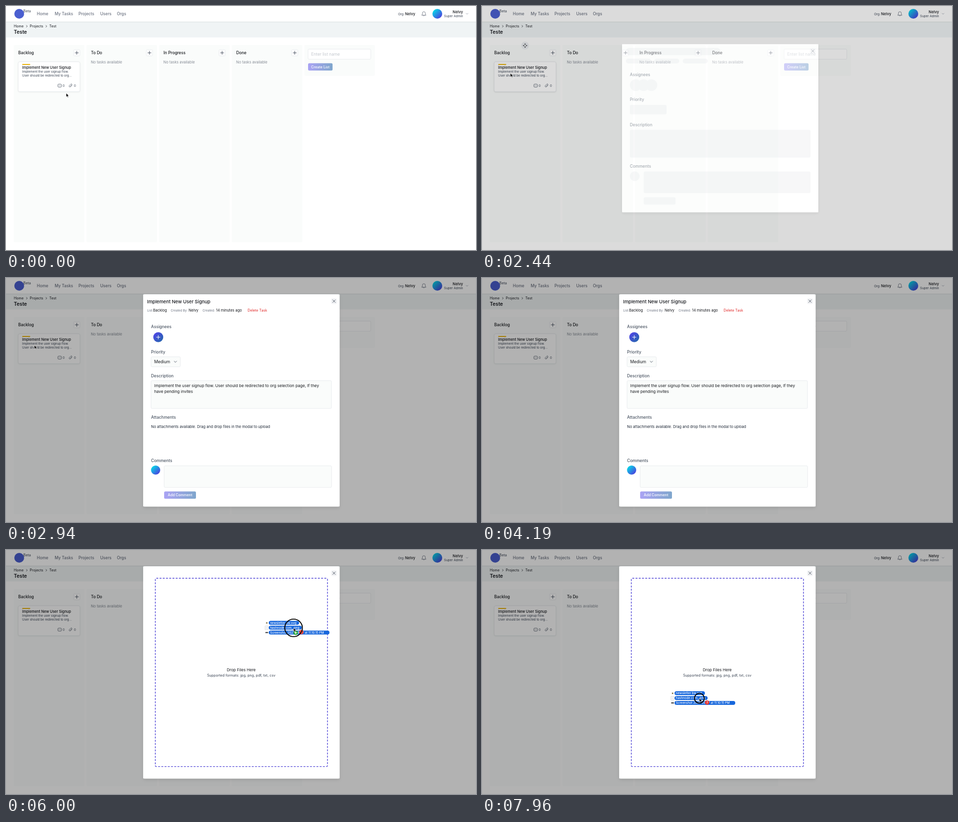
These frames come from a looping animation (960 px wide and 501 px high, 8 s). An HTML page:

```html
<!DOCTYPE html>
<html lang="en">
<head>
<meta charset="utf-8">
<title>Task board</title>
<style>
html, body { margin: 0; width: 100%; height: 100%; overflow: hidden; background: #fff; }
svg { display: block; width: 100%; height: 100%; }
text { font-family: Inter, "Open Sans", sans-serif; white-space: pre; }
</style>
</head>
<body>
<svg id="stage" viewBox="0 0 960 501" xmlns="http://www.w3.org/2000/svg"></svg>
<script>
const INK = '#16181d', GREY = '#6b7280', LABEL = '#4b5563', EDGE = '#e5e7eb', PANEL = '#fafcfb';
const USER = 'Nelvy';

// y is the middle of the capitals
const text = (x, y, size, str, fill = INK, weight = 400, anchor = 'start') =>
  `<text x="${x}" y="${y + size * 0.36}" font-size="${size}" fill="${fill}" font-weight="${weight}" text-anchor="${anchor}">${str}</text>`;
const rect = (x, y, w, h, r, fill, stroke = 'none', extra = '') =>
  `<rect x="${x}" y="${y}" width="${w}" height="${h}" rx="${r}" fill="${fill}" stroke="${stroke}" stroke-width=".8" ${extra}/>`;
const circle = (x, y, r, fill, extra = '') => `<circle cx="${x}" cy="${y}" r="${r}" fill="${fill}" ${extra}/>`;
const line = (d, stroke = INK, width = 0.9) =>
  `<path d="${d}" fill="none" stroke="${stroke}" stroke-width="${width}" stroke-linecap="round" stroke-linejoin="round"/>`;
const group = (id, body) => `<g id="${id}">${body}</g>`;
const plus = (x, y, r, stroke, width) => line(`M${x - r} ${y}h${2 * r}M${x} ${y - r}v${2 * r}`, stroke, width);
const chevron = (x, y, r, stroke) => line(`M${x - r} ${y - r / 2}l${r} ${r} ${r} ${-r}`, stroke);
const gradient = (id, from, to, axis) =>
  `<linearGradient id="${id}" ${axis}><stop stop-color="${from}"/><stop offset="1" stop-color="${to}"/></linearGradient>`;
const shadow = (id, dy, blur, alpha) =>
  `<filter id="${id}" x="-20%" y="-20%" width="140%" height="150%"><feDropShadow dx="0" dy="${dy}" stdDeviation="${blur}" flood-opacity="${alpha}"/></filter>`;
const button = (x, y, w, h, label) =>
  rect(x, y, w, h, 2.5, 'url(#button)') + text(x + w / 2, y + h / 2, 7.3, label, '#fff', 500, 'middle');
const close = (x, y) => rect(x - 6, y - 6, 12, 12, 3, '#f3f4f6') +
  line(`M${x - 2.8} ${y - 2.8}l5.6 5.6m0 -5.6l-5.6 5.6`, '#374151');

const DIAGONAL = 'x1=".12" y1=".12" x2=".88" y2=".88"';
const defs = `<defs>
  ${gradient('avatar', '#06dbe8', '#4b40de', DIAGONAL)}
  ${gradient('accent', '#4f46e5', '#2866b0', DIAGONAL)}
  ${gradient('button', '#aaa3f4', '#7fa6cc', 'x1="0" x2="1"')}
  ${shadow('soft', 0.6, 0.8, 0.1)}${shadow('lift', 1, 1.5, 0.16)}${shadow('deep', 2.5, 3, 0.12)}
</defs>`;

function header() {
  const nav = [[63, 'Home'], [99.5, 'My Tasks'], [148, 'Projects'], [192.5, 'Users'], [226.5, 'Orgs']];
  const crumbs = [[16, 'Home'], [48.5, 'Projects'], [88.5, 'Test']];
  return rect(0, 32, 960, 32.5, 0, '#f0f4f5') + rect(0, 0, 960, 32, 0, '#fff', 'none', 'filter="url(#soft)"') +
    circle(27, 16, 10, '#4a5fd0') + text(35.5, 10.3, 7.2, 'Beta', '#374151') +
    nav.map(([x, s]) => text(x, 16, 8.25, s, GREY, 500)).join('') +
    text(801, 16.3, 6.2, 'Org:', '#374151') + text(815, 16, 7.6, USER, INK, 500) +
    line('M849.3 18.7c1.2-1.2 1.2-2.3 1.2-4a3 3 0 0 1 6 0c0 1.7 0 2.8 1.2 4zM852 19.2a1.6 1.6 0 0 0 3 0', GREY) +
    circle(881, 16, 10, 'url(#avatar)') +
    text(933.5, 12.5, 7.7, USER, INK, 500, 'end') + text(933.5, 21, 6.35, 'Super Admin', '#374151', 400, 'end') +
    chevron(941.7, 16, 2, '#9ca3af') +
    crumbs.map(([x, s]) => text(x, 41.5, 7.15, s)).join('') +
    line('M41.7 39.8l1.8 1.8 -1.8 1.8M81.5 39.8l1.8 1.8 -1.8 1.8', INK, 0.8) +
    text(16, 53.3, 10.1, 'Teste', INK, 600);
}

function column(title, i) {
  const x = 16 + i * 148.4;
  return rect(x, 80, 144, 405, 2, PANEL) + text(x + 9, 96, 8.3, title, INK, 500) +
    rect(x + 122.2, 89.7, 12.8, 12.8, 2, '#fff', EDGE) + plus(x + 128.6, 96.1, 3.4, '#374151', 0.9) +
    (i ? text(x + 8.8, 115.5, 7.47, 'No tasks available', '#858b95') : '');
}

function card() {
  const box = f => rect(25, 114.6, 126, 61.2, 3, '#fff', EDGE, `filter="url(#${f})"`);
  return box('soft') + group('lifted', box('lift')) +
    rect(33, 119, 16.5, 2, 1, '#eab308') +
    text(33, 126.2, 7.35, 'Implement New User Signup', INK, 500) +
    text(33, 134.8, 6.3, 'Implement the user signup flow.', '#374151') +
    text(33, 142.8, 6.25, 'User should be redirected to org...', '#374151') +
    rect(106, 160.4, 7.2, 6.2, 1.6, 'none', '#4b5563') +
    line('M108 163.5h.1m1.5 0h.1m1.5 0h.1', '#4b5563', 0.7) + text(115.7, 163.5, 6.5, '0', '#4b5563') +
    line('M134.8 162.6l-3 3.2a1.7 1.7 0 0 1-2.5-2.3l3.2-3.2a1.2 1.2 0 0 1 1.8 1.6l-3 3.1', '#4b5563', 0.8) +
    text(138.7, 163.5, 6.5, '0', '#4b5563') +
    group('grip', circle(88, 81.3, 8, '#eceff2') +
      line('M84.2 81.3h7.6M88 77.5v7.6M87 78.5l1-1 1 1M87 84.1l1 1 1-1M85.2 80.3l-1 1 1 1M90.8 80.3l1 1-1 1', INK, 0.8) +
      circle(88, 81.3, 1.5, '#eceff2'));
}

const board = () => ['Backlog', 'To Do', 'In Progress', 'Done'].map(column).join('') + card() +
  rect(609.5, 80, 144, 63.5, 2, PANEL) + rect(617, 88.5, 128, 20.8, 2, '#fff', EDGE) +
  text(623.5, 99, 8.4, 'Enter list name', '#c3c7ce') + button(617, 117.6, 50, 14.8, 'Create List');

const LOADING = [286, 78.5, 401, 345], MODAL = [280.3, 33.4, 401, 435.8];
const sheet = box => rect(...box, 3, '#fff', 'none', 'filter="url(#deep)"');
const label = (x, y, s) => text(x, y, 8.4, s, LABEL, 500);

// the dimming leaves the open sheet's own area clear
const shadeAround = ([x, y, w, h]) => `M0 0H960V501H0ZM${x} ${y}h${w}v${h}h${-w}Z`;

function skeleton() {
  const BONE = '#eef0f2';
  const bone = (x, y, w, h, r = 3) => rect(x, y, w, h, r, BONE);
  return sheet(LOADING) + bone(294, 86, 193, 15, 7) +
    [294, 352, 410].map(x => bone(x, 108, 51, 10, 5)).join('') + close(675.7, 92.5) +
    label(302, 140.5, 'Assignees') + [314, 330, 346].map(x => circle(x, 162.5, 12, BONE)).join('') +
    label(302, 192.3, 'Priority') + bone(302, 203, 75, 19.5) +
    label(302, 244.2, 'Description') + bone(302, 254.3, 369, 57) +
    label(302, 329.3, 'Comments') + circle(312, 349.5, 10, BONE) +
    bone(330.3, 339.7, 340.7, 44.5) + bone(330.3, 392.8, 65, 15);
}

function details() {
  const meta = [[288.5, 300.5, 'List:', 'Backlog'], [336.5, 373, 'Created By:', USER], [401.5, 429, 'Created:', '14 minutes ago']];
  return text(288.3, 48.3, 9.5, 'Implement New User Signup', INK, 500) +
    meta.map(([x1, x2, k, v]) => text(x1, 67, 6.2, k, GREY) + text(x2, 66.7, 7.4, v)).join('') +
    text(493.5, 66.7, 7.2, 'Delete Task', '#e02424') +
    label(296.3, 99.5, 'Assignees') + circle(311, 121.5, 10.2, 'url(#accent)') + plus(311, 121.5, 3.6, '#fff', 1.1) +
    label(296.3, 151.5, 'Priority') + rect(296.3, 161.8, 59.8, 20.4, 2, PANEL, EDGE) +
    text(302.8, 172, 8.5, 'Medium') + chevron(346, 172, 2.6, LABEL) +
    label(296.3, 200.8, 'Description') + rect(296.3, 210.8, 368.5, 57, 2, PANEL, EDGE) +
    text(302.8, 221.2, 8.15, 'Implement the user signup flow. User should be redirected to org selection page, If they') +
    text(302.8, 233, 8.15, 'have pending invites') +
    label(296.3, 286, 'Attachments') +
    text(296.3, 305, 7.54, 'No attachments available. Drag and drop files in the modal to upload', '#1f2937') +
    label(296.3, 375, 'Comments') + circle(305.6, 394.3, 9.4, 'url(#avatar)') +
    rect(323, 385.7, 342, 44.3, 2, PANEL, EDGE) + button(323, 438.2, 65, 15, 'Add Comment');
}

const dropZone = () =>
  `<rect x="305" y="58" width="351.6" height="386.6" rx="2" fill="none" stroke="#5046d6" stroke-width="1.4" stroke-dasharray="4 2.6"/>` +
  text(480.5, 246, 8.1, 'Drop Files Here', INK, 400, 'middle') +
  text(480.5, 257.5, 7.2, 'Supported formats: jpg, png, pdf, txt, csv', '#374151', 400, 'middle');

// everything being dragged, relative to the pointer
function files() {
  const rows = [['newsletter bw.svg', 62], ['hashnode.com_.png', 67.5], ['Screenshot 2021-08-17 at 11.10.15 PM', 124]];
  return rows.map(([name, w], i) => rect(-50.7, i * 10 - 14.3, w, 8, 4, '#1767dc') +
      text(-48, i * 10 - 10.3, 6.2, name, '#fff', 500)).join('') +
    rect(-57.3, -12.7, 5, 5, 1, '#f3f1ec') + circle(-54.7, -10.2, 1.3, '#6b5a2c') +
    rect(-58.3, -4, 6.4, 8, 0.6, '#fafafa', '#d4d6da') + line('M-56.5 -1h2.5m-2.5 2h2.5', '#c9ccd1', 0.5) +
    rect(-57.6, 8.7, 5.6, 2, 0.4, '#333') +
    circle(15.8, 8.8, 4.4, '#e8332a') + text(15.8, 8.8, 6, '3', '#fff', 500, 'middle') +
    group('copy', circle(4.3, 10, 4.5, '#1fa52b') + plus(4.3, 10, 2.4, '#fff', 1.2));
}

const pointer = () =>
  `<path id="arrow" d="M0 0V7.8L1.8 6.1 3 8.8 4.3 8.2 3.1 5.6H5.5Z" fill="#000" stroke="#fff" stroke-width=".6"/>` +
  `<path id="hand" d="M-.6 .4c0-1 1.4-1 1.4 0V3c1-.5 1.6-.2 1.7.3 .7-.3 1.3 0 1.4.5 .8-.2 1.2.2 1.2.9 0 1.6-.4 3.3-1.4 4.1H0C-.8 7.6-2 6.3-2.5 5.3c-.3-.8.6-1.2 1.2-.6l.7.6Z" fill="#fff" stroke="#000" stroke-width=".8" stroke-linejoin="round"/>` +
  circle(0, 0, 18, 'none', 'id="ring" stroke="#000" stroke-width="1.9"');

const stage = document.getElementById('stage');
stage.innerHTML = defs + rect(0, 0, 960, 501, 0, '#fff') + header() + board() +
  '<path id="shade" fill-rule="evenodd"/>' + group('loading', skeleton()) +
  group('modal', sheet(MODAL) + group('details', details()) + group('drop', dropZone()) + close(670, 47.5)) +
  group('pointer', group('files', files()) + pointer());

const el = {};
stage.querySelectorAll('g[id], path[id], circle[id]').forEach(n => el[n.id] = n);
const show = (id, on) => el[id].style.display = on ? '' : 'none';
const fade = (id, v) => el[id].style.opacity = v;
const ramp = (t, from, to) => Math.min(1, Math.max(0, (t - from) / (to - from)));
const easeOut = p => 1 - (1 - p) ** 2;

const leave = [[3790, 58, 138], [3950, 220, 212], [4070, 659, 320], [4130, 841, 325], [4190, 985, 320]];
const drag = [[5660, 990, 150], [5840, 785, 142], [6000, 588, 159.5], [6130, 508, 212], [6280, 460, 257],
  [6500, 458, 260], [6830, 458, 260], [7030, 444, 304.4]];

function along(keys, t) {
  const next = keys.findIndex(k => k[0] > t);
  if (next < 0) return keys[keys.length - 1].slice(1);
  const [t0, x0, y0] = keys[next - 1], [t1, x1, y1] = keys[next];
  const p = ramp(t, t0, t1);
  return [x0 + (x1 - x0) * p, y0 + (y1 - y0) * p];
}

function position(t) {
  if (t >= 5680) return along(drag, t);
  if (t >= 3790) return along(leave, t);
  const p = easeOut(ramp(t, 20, 410));
  return [123 - 65 * p, 179 - 41 * p];
}

function ringRadius(t) {
  if (t >= 7770) return 18 - 8 * ramp(t, 7860, 7960);
  if (t >= 5680) return 18;
  if (t < 2280 || t >= 2440) return 0;
  return t < 2360 ? 14.3 : t < 2400 ? 18 : 10;
}

function render(t) {
  const [x, y] = position(t);
  const dragging = t >= 5680, inside = dragging && x < 681, loaded = t >= 2940;
  const overCard = t < 2400 && y < 176;
  const radius = ringRadius(t);

  el.pointer.setAttribute('transform', `translate(${x.toFixed(2)} ${y.toFixed(2)})`);
  show('pointer', t < 4190 || dragging);
  show('arrow', !overCard);
  show('hand', overCard);
  show('ring', radius > 0);
  el.ring.setAttribute('r', radius);
  show('files', dragging);
  show('copy', inside && t < 7930);

  fade('lifted', ramp(t, 50, 200) * (1 - ramp(t, 2360, 2490)));
  fade('grip', ramp(t, 50, 200) * (1 - ramp(t, 2500, 2650)));

  const open = easeOut(ramp(t, 2360, 2660));
  el.shade.setAttribute('d', shadeAround(loaded ? MODAL : LOADING));
  fade('shade', 0.3 * open);
  fade('loading', open);
  show('loading', open > 0 && !loaded);
  show('modal', loaded);
  show('details', !inside);
  show('drop', inside);
}

function tick() {
  render(performance.now() % 8000);
  requestAnimationFrame(tick);
}
tick();
</script>
</body>
</html>
```
